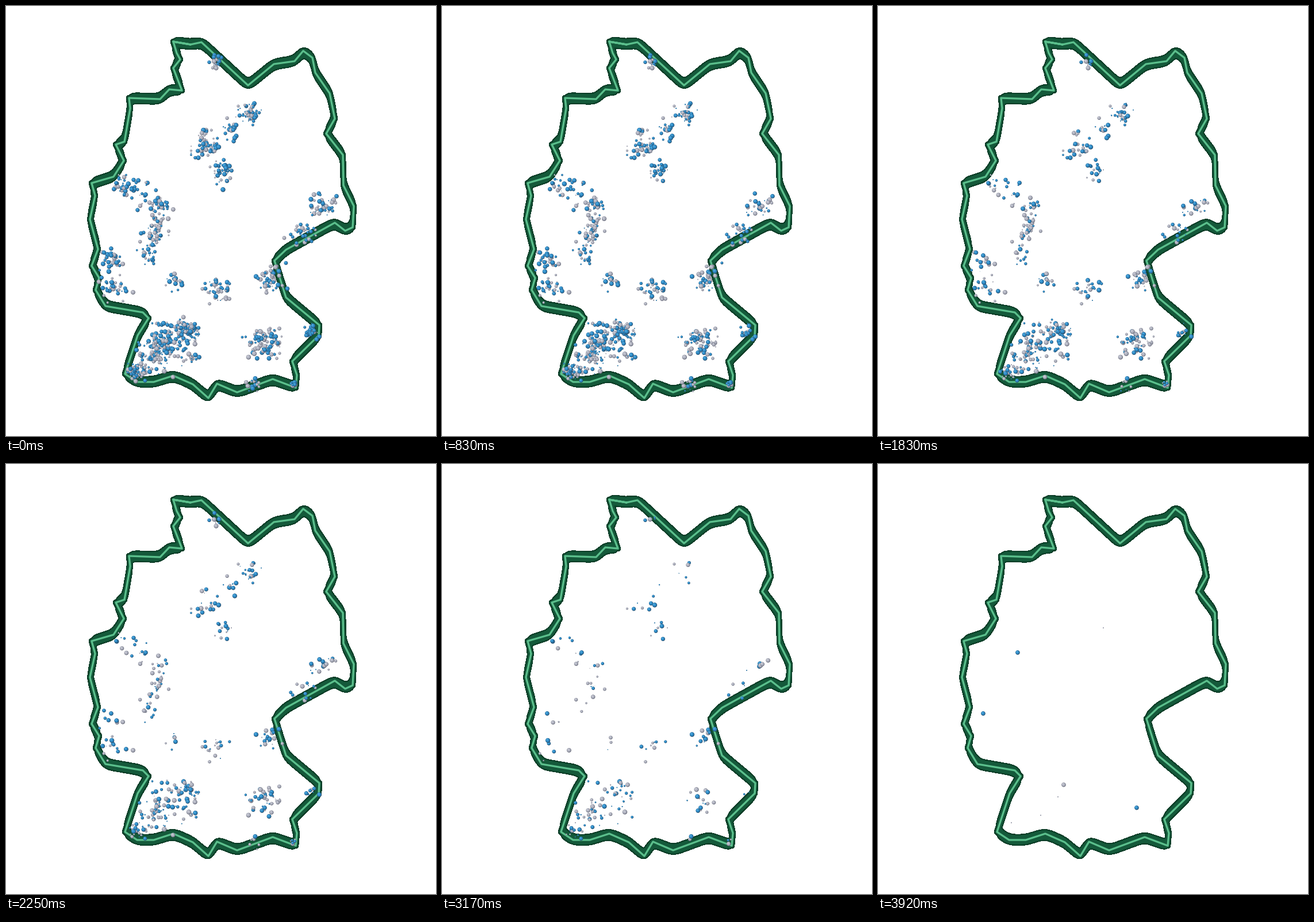
These frames come from a looping animation (748x748 px, 4 s). A matplotlib script:

```python
import numpy as np
import matplotlib.pyplot as plt
from matplotlib.animation import FuncAnimation

SIZE, DPI = 748, 88
PT = 72 / DPI              # points per pixel
FRAMES, LOOP = 48, 4000
FADE = 110                 # ms a dot takes to shrink away

DARK, GREEN, LIGHT = "#0b3d27", "#14593a", "#5bbf8c"
BLUE = ("#28506f", "#2b88c4", "#4ba3d8")
GREY = ("#6c6f7d", "#adb0be", "#c3c5d0")

BORDER = np.array([
    (291, 62), (321, 67), (340, 63), (421, 138), (466, 101), (502, 96),
    (517, 78), (533, 90), (538, 116), (563, 152), (572, 196), (557, 222),
    (586, 259), (587, 312), (605, 348), (603, 385), (590, 391), (572, 377),
    (487, 424), (467, 443), (487, 507), (545, 555), (544, 573), (498, 618),
    (506, 642), (504, 664), (464, 649), (402, 672), (367, 657), (352, 682),
    (325, 658), (291, 643), (257, 654), (228, 654), (207, 640), (229, 573),
    (248, 543), (238, 533), (173, 522), (156, 494), (162, 473), (149, 452),
    (160, 423), (146, 371), (155, 330), (149, 308), (187, 297), (205, 269),
    (191, 241), (206, 236), (216, 178), (214, 160), (268, 162), (284, 145),
    (306, 147), (291, 108), (303, 93), (297, 82)], float)

# centre x, y, spread, number of dots
CLUSTERS = [
    (365, 97, 6, 24), (424, 187, 10, 46), (391, 215, 11, 20),
    (346, 240, 12, 52), (377, 288, 11, 40), (204, 314, 10, 34),
    (240, 331, 12, 20), (271, 350, 10, 32), (259, 393, 12, 48),
    (250, 434, 8, 22), (178, 442, 10, 30), (185, 492, 12, 34),
    (292, 480, 7, 20), (368, 494, 12, 44), (459, 477, 12, 52),
    (552, 345, 11, 40), (517, 396, 11, 32), (450, 587, 13, 96),
    (530, 566, 7, 22), (428, 660, 6, 20), (500, 656, 4, 12),
    (313, 566, 11, 74), (280, 584, 16, 90), (257, 610, 15, 70),
    (226, 638, 8, 60), (318, 613, 9, 18)]

# Dots that stay to the end; the first four are large.
LAST = [(243, 328), (183, 434), (323, 558), (450, 598),
        (392, 285), (313, 579), (283, 611), (232, 624)]


def resample(points, step=1.5):
    ring = np.vstack([points, points[:1]])
    dist = np.r_[0, np.cumsum(np.hypot(*np.diff(ring, axis=0).T))]
    at = np.arange(0, dist[-1], step)
    return np.column_stack([np.interp(at, dist, ring[:, i]) for i in (0, 1)])


def smooth(points, sigma):
    """Gaussian blur along a closed line."""
    n = len(points)
    k = np.minimum(np.arange(n), n - np.arange(n))
    kernel = np.exp(-.5 * (k / sigma) ** 2)
    kernel /= kernel.sum()
    spectrum = np.fft.fft(points, axis=0) * np.fft.fft(kernel)[:, None]
    return np.fft.ifft(spectrum, axis=0).real


def make_dots(rng):
    parts = []
    for x, y, spread, n in CLUSTERS:
        offset = np.clip(rng.normal(size=(n, 2)), -2, 2)
        stray = np.where(rng.random((n, 1)) < .08, 1.5, 1)
        parts.append((x, y) + offset * stray * spread)
    pos = rng.permutation(np.vstack(parts))
    n = len(pos)
    radius = np.maximum(.9, 4.2 * rng.random(n) ** .6)
    blue = rng.random(n) < .6
    life = rng.random(n) * (LOOP - 80)

    big = np.arange(len(LAST)) < 4
    pos = np.vstack([pos, LAST])
    radius = np.r_[radius, np.where(big, 3.8, .9)]
    blue = np.r_[blue, big & (np.arange(len(LAST)) != 2)]
    life = np.r_[life, np.full(len(LAST), 2 * LOOP)]
    return pos, radius, blue, life


fig = plt.figure(figsize=(SIZE / DPI, SIZE / DPI), dpi=DPI, facecolor="white")
ax = fig.add_axes([0, 0, 1, 1])
ax.set(xlim=(0, SIZE), ylim=(SIZE, 0))
ax.axis("off")


def stroke(points, width, color, dy=0, crisp=False):
    ring = np.vstack([points, points[:2]])
    ax.plot(ring[:, 0], ring[:, 1] + dy, color=color, lw=width * PT,
            solid_joinstyle="round", solid_capstyle="round",
            antialiased=not crisp)


# The wall is a softened line swept vertically, with the crisp rim on top.
soft = smooth(resample(BORDER), 5.5)
for color, width in ((DARK, 9.5), (GREEN, 6.5)):
    for dy in np.linspace(-5, 5, 7):
        stroke(soft, width, color, dy, crisp=color == DARK)
    stroke(BORDER, width, color, crisp=color == DARK)
stroke(BORDER, 3.3, LIGHT)

pos, radius, blue, life = make_dots(np.random.default_rng(12))
# Each dot is a rim, a body and a highlight, stacked in that order.
scale = np.array([1, .84, .45])
shift = np.array([[0, 0], [-.1, -.12], [-.28, -.3]])
places = pos[:, None] + radius[:, None, None] * shift
colors = np.array([BLUE if b else GREY for b in blue]).ravel()
dots = ax.scatter(*places.reshape(-1, 2).T, s=1, c=colors, linewidths=0,
                  zorder=5)


def draw(i):
    t = i * LOOP / FRAMES
    r = radius * np.clip((life - t) / FADE, 0, 1) if i else radius
    dots.set_sizes(((2 * PT * r[:, None] * scale) ** 2).ravel())
    return dots,


anim = FuncAnimation(fig, draw, frames=FRAMES, interval=LOOP / FRAMES,
                     repeat=True, repeat_delay=0, blit=False)
plt.show()
```
